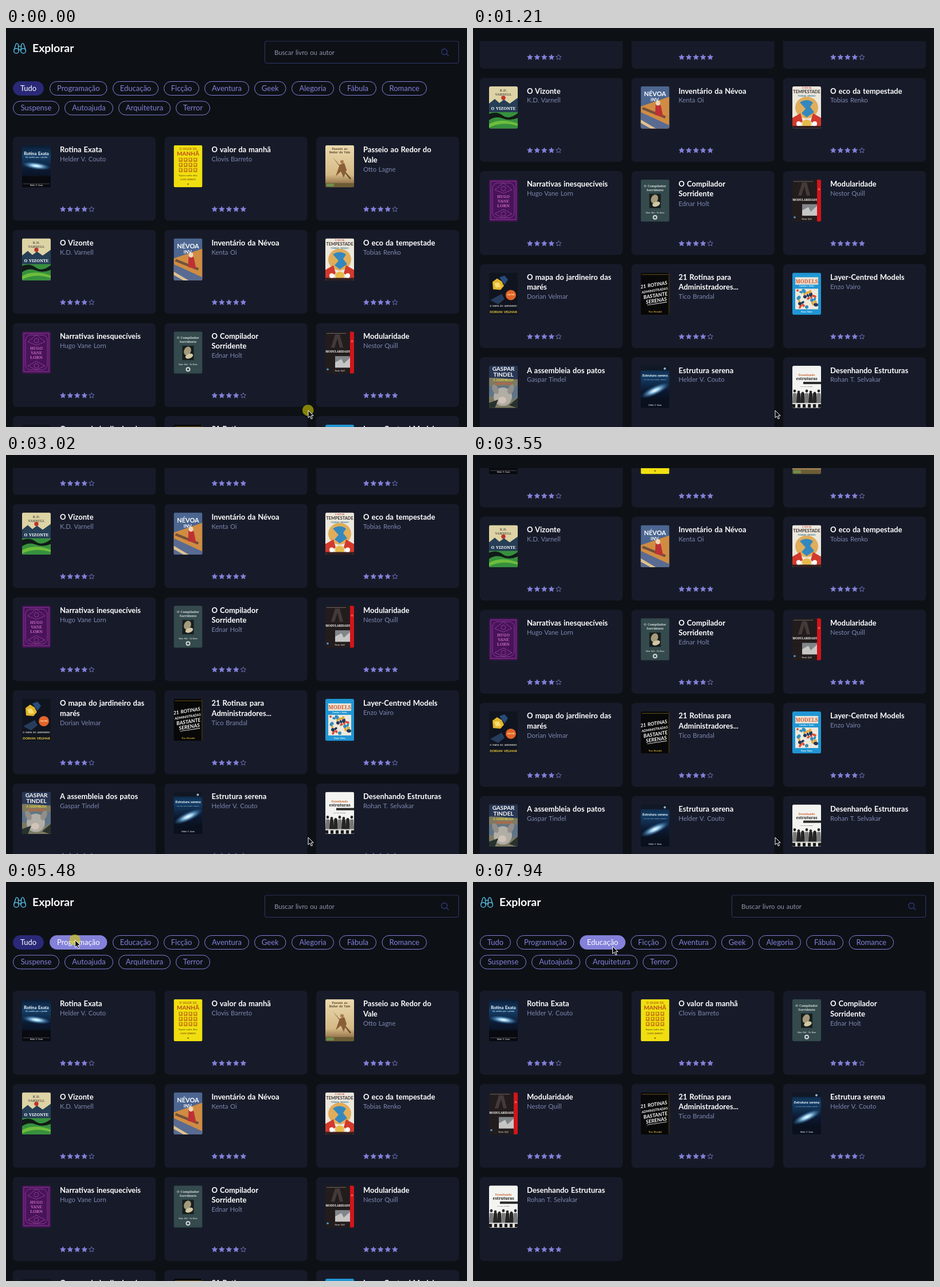
Animation of 804 by 697 pixels, one loop 8 s. Source, as an HTML page:

```html
<!DOCTYPE html>
<html lang="pt">
<head>
<meta charset="utf-8">
<style>
html, body { margin: 0; width: 100%; height: 100%; overflow: hidden; background: #0d1116; }
svg { display: block; width: 804px; height: 697px; font-family: Lato, "Open Sans", sans-serif; word-spacing: .05em; }
.h { font-size: 19.4px; font-weight: 700; fill: #fff; }
.search { font-size: 11.3px; fill: #9295a8; }
.chip rect { fill: none; stroke: #8481da; }
.chip text { font-size: 13px; fill: #8481da; text-anchor: middle; }
.chip.on rect { fill: #2a2977; stroke: #2a2977; }
.chip.hover rect { fill: #8481da; stroke: #8481da; }
.chip.on text, .chip.hover text { fill: #fff; }
.title { font-size: 13px; font-weight: 700; fill: #fff; }
.author { font-size: 11.3px; fill: #7d86b0; }
.cover text { text-anchor: middle; font-weight: 700; }
.star { fill: #8481da; stroke: #8481da; stroke-width: .8; stroke-linejoin: round; }
.star.empty { fill: none; }
</style>
</head>
<body>
<svg viewBox="0 0 804 697">
  <defs>
    <clipPath id="view"><rect y="22.5" width="804" height="675"/></clipPath>
    <clipPath id="shelf"><rect y="190" width="804" height="1200"/></clipPath>
    <clipPath id="jacket"><rect width="50" height="73.5" rx="3"/></clipPath>
    <linearGradient id="sky" x2="0" y2="1">
      <stop stop-color="#0b1a30"/><stop offset=".25" stop-color="#14406a"/>
      <stop offset=".6" stop-color="#0b1830"/><stop offset="1" stop-color="#080a10"/>
    </linearGradient>
    <linearGradient id="sand" x2="0" y2="1">
      <stop stop-color="#ead9ae"/><stop offset=".7" stop-color="#d5b985"/><stop offset="1" stop-color="#7c5836"/>
    </linearGradient>
    <radialGradient id="glow">
      <stop stop-color="#fff"/><stop offset=".3" stop-color="#9fd2f0"/><stop offset="1" stop-color="#2b74b5" stop-opacity="0"/>
    </radialGradient>
  </defs>
  <g clip-path="url(#view)">
    <g id="page">
      <g fill="none" stroke="#54b3d8" stroke-width="1.5" stroke-linejoin="round">
        <circle cx="18" cy="40" r="4.3"/><circle cx="30.2" cy="40" r="4.3"/>
        <path d="M13.8 39 17 29Q17.3 27 19 27T21.2 29L22.3 40M34.4 39 31.2 29Q30.9 27 29.2 27T27 29L25.9 40M21.4 32H26.8M22.3 38H25.9"/>
      </g>
      <text class="h" x="46" y="42">Explorar</text>
      <rect x="451.5" y="23" width="338" height="38.5" rx="3" fill="none" stroke="#30386a"/>
      <text class="search" x="468" y="46.5">Buscar livro ou autor</text>
      <path d="M769.5 41.5a5 5 0 1 1-10 0 5 5 0 1 1 10 0M768.3 45.3 772.3 49" fill="none" stroke="#2f3879" stroke-width="1.3"/>
      <g id="chips"></g>
      <g clip-path="url(#shelf)"><g id="list"></g></g>
    </g>
  </g>
  <circle id="ring" r="9.8" fill="#d7cf00"/>
  <path id="cursor" d="M0 0V12.8L3 10 5.2 14.9 7.4 14 5.2 9.2H9.2Z" fill="#0c0e12" stroke="#fff"/>
</svg>
<script>
const $ = id => document.getElementById(id);
const range = n => [...Array(n).keys()];

// Drawing helpers for the covers (50 x 73.5 units)
const R = (x, y, w, h, fill) => `<rect x="${x}" y="${y}" width="${w}" height="${h}" fill="${fill}"/>`;
const E = (x, y, rx, ry, fill, turn = 0) =>
  `<ellipse cx="${x}" cy="${y}" rx="${rx}" ry="${ry}" fill="${fill}" transform="rotate(${turn} ${x} ${y})"/>`;
const P = (d, fill) => `<path d="${d}" fill="${fill}"/>`;
const T = (y, size, fill, text, more = '') =>
  `<text x="25" y="${y}" font-size="${size}" fill="${fill}" ${more}>${text}</text>`;
const bg = fill => R(0, 0, 50, 73.5, fill);
const serif = 'font-family="Noto Serif, serif"';

const covers = [
  bg('url(#sky)') + T(17, 7.6, '#fff', 'Rotina Exata') + T(22, 2.8, '#cfe2f2', 'Um caminho para a precisão')
    + E(25, 36, 25, 6.5, 'url(#glow)', 8) + R(0, 54, 50, 20, '#080a10')
    + R(2, 67, 46, .6, '#777') + T(71.5, 3, '#ddd', 'Helder V. Couto'),
  bg('#f0df10') + T(8, 4.8, '#b5651d', 'O VALOR DA') + T(18.5, 10, '#b84a1c', 'MANHÃ')
    + range(12).map(i => R(9 + i % 4 * 8.5, 22 + (i / 4 | 0) * 9, 6.5, 7, '#c98212')
      + E(12 + i % 4 * 8.5, 25 + (i / 4 | 0) * 9, 1.6, 2, '#f0df10')).join('')
    + T(54, 2.7, '#6c5a10', 'Pequenas escolhas diárias') + T(61, 3.2, '#8c5a10', 'CLOVIS BARRETO') + E(25, 68, 1.3, 1.3, '#8c5a10'),
  bg('url(#sand)') + T(8, 5, '#584126', 'Passeio ao', serif) + T(14, 5, '#584126', 'Redor do Vale', serif)
    + P('M12 20 45 58 43 60Z', '#6d4c2c') + P('M25 34 33 31 37 43 32 57 27 46 18 54Z', '#8a5e38')
    + E(29, 29, 3, 3, '#a97848') + R(0, 66, 50, 8, '#6c5d36') + R(2, 67, 13, 5, '#6e8f4c'),
  bg('#ddd3a4') + T(9, 6, '#5d574d', 'K.D.', serif) + T(16, 6, '#5d574d', 'VARNELL', serif) + E(25, 20, 3.7, 3.7, '#bd332c')
    + P('M0 30 10 22 18 29 26 23 36 30 50 20V46H0Z', '#263e56') + T(41, 7.4, '#fff', 'O VIZONTE', serif)
    + R(0, 45, 50, 29, '#36903d') + P('M0 48Q14 43 24 51T50 47V55Q36 61 24 56T0 59Z', '#111a17')
    + P('M0 66Q20 54 50 65V69Q22 60 0 72Z', '#6ebd3c'),
  bg('#4c6691') + P('M0 35 50 18V74H0Z', '#d08c42') + P('M0 45 50 68V74H0Z', '#596b92')
    + P('M4 36 44 52 42 56 2 40Z', '#72513a') + T(17, 11, '#fff', 'NÉVOA') + T(26, 8, '#fff', 'INV.')
    + P('M26 31 35 33 39 53 25 50Z', '#be3034') + E(30, 29, 4, 4.5, '#edd7bd') + P('M0 58 27 74H18L0 64Z', '#dfc28f'),
  bg('#ece7dc') + T(4, 3, '#c33', 'O ECO DA') + T(12, 7.4, '#3a3230', 'TEMPESTADE') + T(18, 4.2, '#357a9c', 'TOBIAS RENKO')
    + E(25, 37, 20, 19, '#e0ad5b') + P('M13 28Q25 20 36 28L31 36 38 45 25 54 16 47 23 39Z', '#3488bd')
    + P('M0 55 14 47 18 61 0 74Z', '#d23a2c') + P('M50 55 36 47 32 61 50 74Z', '#d23a2c')
    + E(25, 65, 8, 7, '#e7b94a') + R(0, 69, 50, 5, '#331f20') + E(11, 65, 4, 4, '#fff') + E(39, 65, 4, 4, '#fff'),
  bg('#481359') + '<g fill="none" stroke="#95409b" stroke-width=".9"><rect x="3" y="3" width="44" height="67"/>'
    + '<rect x="6" y="6" width="38" height="61" rx="9"/><path d="M25 6 40 18 25 24 10 18ZM25 52 40 60 25 67 10 60Z"/>'
    + '<circle cx="25" cy="16" r="4"/><circle cx="25" cy="60" r="4"/></g>'
    + T(32, 7, '#c468bb', 'HUGO', serif) + T(40, 7, '#c468bb', 'VANE', serif) + T(48, 7.5, '#c468bb', 'LORN', serif),
  bg('#344a4d') + T(13, 5.4, '#d8dedb', 'O Compilador', serif) + T(20, 5.4, '#d8dedb', 'Sorridente', serif)
    + R(15, 25, 20, 25, '#171d1d') + E(24, 34, 6, 8, '#a49a7c', 25) + E(27, 43, 7, 4, '#d2c7a5', -20)
    + T(59, 3, '#ddd', 'Ednar Holt · Cia Brum') + E(25, 66, 4, 4, '#d4d8d6') + E(25, 66, 2, 2, '#344a4d'),
  bg('#231c1d') + P('M10 28 17 5H25L31 28H25L21 12 16 28Z', '#443a3a') + R(2, 3, 34, .7, '#888')
    + T(37, 5, '#fff', 'MODULARIDADE', serif + ' dx="-3"') + R(17, 43, 26, 20, '#81868a')
    + P('M17 54 28 48 32 56 43 46V63H17Z', '#c6c7c5') + R(43, 0, 7, 73.5, '#d3141a') + E(46.5, 17, 2, 2, '#f05545')
    + E(4, 66, 1.8, 1.8, '#4a9ad2') + T(70, 3, '#ccc', 'Nestor Quill'),
  bg('#10141e') + P('M6 16 14 10 22 15 26 23 20 30 7 29Z', '#e3b52c') + P('M9 18 17 17 21 25 12 26Z', '#f6dc70')
    + P('M18 8 27 5 33 12 27 21Z', '#274b7d') + E(38, 39, 9, 9, '#e2642a') + T(40, 3.6, '#fff0a6', 'CALMA', 'dx="13"')
    + P('M2 48 22 37 27 46 16 55Z', '#263c5d') + T(60, 3.8, '#ddd', 'O MAPA DO JARDINEIRO') + T(71, 5.7, '#f2d344', 'DORIAN VELMAR'),
  bg('#080808') + R(2, 3, 46, .7, '#92701e') + '<g transform="rotate(-9 25 35)" font-style="italic">'
    + T(24, 8.6, '#fff', '21 ROTINAS') + T(33, 6, '#fff', 'ADMINISTRADAS') + T(43, 9, '#fff', 'BASTANTE')
    + T(52, 9, '#fff', 'SERENAS') + R(8, 54, 35, .8, '#fff') + '</g>' + T(70, 4, '#e2b83d', 'Tico Brandal') + R(49, 0, 1, 73.5, '#7a581c'),
  bg('#2096d4') + R(5, 8, 40, 13, '#e7e4d8') + T(18.5, 9, '#d9592d', 'MODELS', serif) + T(25, 3, '#fff', 'Camadas e limites')
    + R(5, 28, 40, 36, '#ede9dc') + range(24).map(i => E(9 + i * 13 % 33, 31 + i * 11 % 30, 2 + i % 3, 2 + i % 2,
      ['#d94e38', '#253858', '#e3a83d', '#338fbd'][i % 4], i * 37)).join('') + T(70, 4, '#fff', 'Enzo Vairo'),
  bg('#263a5a') + P('M0 20 50 24V74H0Z', '#7d7a62') + R(0, 0, 50, 21, '#293653') + T(9, 10, '#fff', 'GASPAR') + T(19, 10, '#fff', 'TINDEL')
    + T(27, 5, '#f2d740', 'A ASSEMBLEIA') + T(33, 5, '#e85335', 'DOS PATOS') + P('M0 35H50V54L38 61 0 53Z', '#5f7487')
    + E(24, 54, 16, 16, '#b1aea6') + E(11, 41, 5, 9, '#928e89', -25) + E(38, 41, 5, 9, '#928e89', 25)
    + E(23, 60, 7, 6, '#d2c3b8') + P('M0 65 16 59 10 74H0ZM35 69 50 56V74Z', '#27322e'),
  bg('url(#sky)') + R(0, 0, 50, 8, '#111824') + E(42, 5, 2, 2, '#99b6ce') + T(19, 5.9, '#fff', 'Estrutura serena')
    + T(25, 2.6, '#c6d7ea', 'Um guia para projetar sistemas') + E(25, 43, 27, 8, 'url(#glow)', -25) + R(0, 62, 50, 12, '#0b1020')
    + T(70, 3, '#ddd', 'Helder V. Couto'),
  bg('#f3f3f1') + T(18, 4.6, '#cd6b35', 'Desenhando', serif) + T(25, 7, '#1c1c1c', 'estruturas', serif) + R(19, 28, 31, 4, '#282828')
    + T(37, 2.5, '#555', 'Um livro ilustrado') + R(0, 54, 50, 20, '#dcdcda')
    + range(7).map(i => E(4 + i * 7, 44 + i % 3 * 2, 2.3, 2.6, '#292929')
      + P(`M${1 + i * 7} 48H${7 + i * 7}L${8 + i * 7} 65H${i * 7}Z`, i % 3 ? '#252525' : '#777')).join('')
    + range(6).map(i => R(i * 9, 67, 5, 6, '#181818')).join('')
];

// Title lines, author, stars
const books = [
  ['Rotina Exata', 'Helder V. Couto', 4],
  ['O valor da manhã', 'Clovis Barreto', 5],
  ['Passeio ao Redor do|Vale', 'Otto Lagne', 4],
  ['O Vizonte', 'K.D. Varnell', 4],
  ['Inventário da Névoa', 'Kenta Oi', 5],
  ['O eco da tempestade', 'Tobias Renko', 4],
  ['Narrativas inesquecíveis', 'Hugo Vane Lorn', 4],
  ['O Compilador|Sorridente', 'Ednar Holt', 4],
  ['Modularidade', 'Nestor Quill', 5],
  ['O mapa do jardineiro das|marés', 'Dorian Velmar', 4],
  ['21 Rotinas para|Administradores...', 'Tico Brandal', 4],
  ['Layer-Centred Models', 'Enzo Vairo', 4],
  ['A assembleia dos patos', 'Gaspar Tindel', 4],
  ['Estrutura serena', 'Helder V. Couto', 4],
  ['Desenhando Estruturas', 'Rohan T. Selvakar', 5]
];

const starPoints = range(10).map(i => {
  const r = i % 2 ? 2.3 : 4.9, a = i * Math.PI / 5;
  return `${(r * Math.sin(a)).toFixed(2)},${(-r * Math.cos(a)).toFixed(2)}`;
}).join(' ');

$('list').innerHTML = books.map(([title, author, stars], n) => {
  const lines = title.split('|');
  return `<g><rect width="249" height="146.5" rx="7" fill="#171b29"/>
    <g class="cover" transform="translate(16 14.8)" clip-path="url(#jacket)">${covers[n]}</g>`
    + lines.map((s, i) => `<text class="title" x="82" y="${27.4 + i * 17.2}">${s}</text>`).join('')
    + `<text class="author" x="82" y="${43.2 + (lines.length - 1) * 17.5}">${author}</text>`
    + range(5).map(i => `<polygon class="star ${i < stars ? '' : 'empty'}" points="${starPoints}"
      transform="translate(${87.3 + i * 12.5} 126.7)"/>`).join('') + '</g>';
}).join('');

const chips = [
  ['Tudo', 12, 54], ['Programação', 76, 100.5], ['Educação', 186, 80], ['Ficção', 275, 62], ['Aventura', 346, 78],
  ['Geek', 433, 55.5], ['Alegoria', 498, 74], ['Fábula', 581, 65], ['Romance', 655.5, 78.5],
  ['Suspense', 12, 81, 1], ['Autoajuda', 102, 85, 1], ['Arquitetura', 196, 91, 1], ['Terror', 296, 60, 1]
].map(([name, x, w, row = 0]) => ({ name, x, w, y: 93 + row * 34.4 }));

$('chips').innerHTML = chips.map(c => `<g class="chip">
  <rect x="${c.x + .5}" y="${c.y + .5}" width="${c.w - 1}" height="24" rx="12"/>
  <text x="${c.x + c.w / 2}" y="${c.y + 16.9}">${c.name}</text></g>`).join('');

// Rows: time, page scroll, list scroll
const scrollKeys = [
  [0, 0, 0], [70, 0, 25], [330, 0, 98.5], [600, 0, 98.5], [670, 2, 98.5], [820, 8.5, 98.5], [1210, 167, 98.5],
  [1820, 167, 98.5], [2100, 156, 120], [2360, 156, 120], [2560, 167, 100], [2950, 167, 100], [3160, 167, 85],
  [3480, 167, 85], [3550, 167, 78], [3630, 144, 0], [3770, 31, 0], [3910, 1.5, 0], [3980, 0, 0]
];
// Rows: time, cursor x, cursor y
const cursorKeys = [
  [4170, 527, 668], [4500, 260, 420], [4760, 20, 190], [4860, 40, 112], [5000, 110, 128], [5280, 120.5, 101.5],
  [6440, 120.5, 101.5], [7060, 238, 115], [7250, 238, 115], [7390, 240, 115], [7460, 240, 115], [7540, 243.5, 112.5]
];
const clicks = [[-100, 250], [5440, 5800], [7540, 7860]];
// Start time, active chip, books shown
const filters = [
  [0, 0, range(15)],
  [5700, 1, [0, 7, 8, 10, 11, 13, 14]],
  [7740, 2, [0, 1, 7, 8, 10, 13, 14]]
];

const STEP = 80;

function track(keys, t) {
  const i = keys.findIndex(k => k[0] > t);
  if (i < 0) return keys.at(-1).slice(1);
  if (!i) return keys[0].slice(1);
  const a = keys[i - 1], b = keys[i];
  const u = Math.floor((t - a[0]) / STEP) * STEP / (b[0] - a[0]);
  return [1, 2].map(j => a[j] + (b[j] - a[j]) * u);
}

const move = (el, x, y) => el.setAttribute('transform', `translate(${x} ${y})`);
const cards = [...$('list').children], chipEls = [...$('chips').children];
let shown;

function arrange(order) {
  shown = order;
  cards.forEach((card, n) => {
    const i = order.indexOf(n);
    card.style.display = i < 0 ? 'none' : '';
    move(card, 12 + i % 3 * 264.5, 190 + Math.floor(i / 3) * 162.7);
  });
}

function draw(t) {
  const [outer, inner] = track(scrollKeys, t), [x, y] = track(cursorKeys, t);
  const [, active, order] = filters.findLast(f => f[0] <= t);
  if (order !== shown) arrange(order);
  move($('page'), 0, -outer);
  move($('list'), 0, -inner);
  move($('cursor'), x, y);
  move($('ring'), x - .3, y - .2);
  const click = clicks.find(c => t >= c[0] && t < c[1]);
  $('ring').setAttribute('opacity', click ? .6 * Math.min(1, (click[1] - t) / 180) : 0);
  chips.forEach((c, i) => {
    const over = x >= c.x && x <= c.x + c.w && y >= c.y && y <= c.y + 25;
    const keepsDark = i === 0 && active === 0;
    chipEls[i].setAttribute('class', 'chip' + (over && !keepsDark ? ' hover' : i === active ? ' on' : ''));
  });
}

const start = performance.now();
(function frame() {
  draw((performance.now() - start) % 8000);
  requestAnimationFrame(frame);
})();
</script>
</body>
</html>
```
